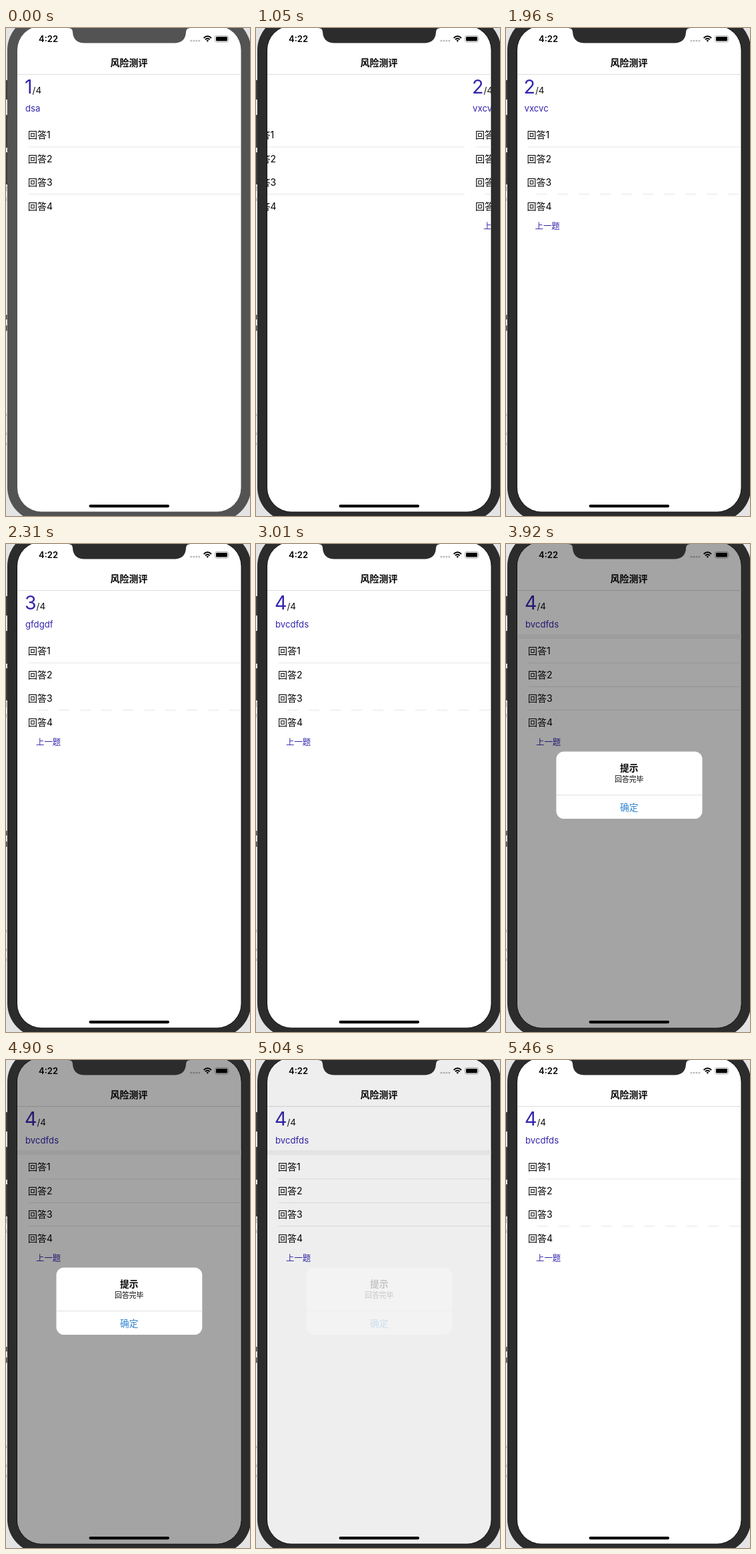
These frames come from a looping animation (366 px wide and 730 px high, 6.3 s). An HTML page:

```html
<!DOCTYPE html>
<html lang="zh">
<head>
<meta charset="utf-8">
<style>
html, body { margin: 0; width: 100%; height: 100%; overflow: hidden; background: #e4e4e4; }
svg { display: block; font-family: Inter, "Noto Sans CJK SC", "Noto Sans CJK", sans-serif; }
.ink { fill: #3426ae; }
.line { stroke: #e6e6e6; }
.mid { text-anchor: middle; }
</style>
</head>
<body>
<svg width="366" height="730" viewBox="0 0 366 730">
  <defs>
    <clipPath id="screen"><rect x="17" y="-3" width="335.5" height="726.5" rx="36"/></clipPath>
  </defs>
  <g fill="#3d3d3d">
    <path d="M0 78h3v29h-3zM0 130h3v49h-3zM0 186h3v48h-3z"/>
    <path d="M0 429h1.5v7H0zM0 445h1.5v8H0z"/>
    <path d="M0 237h1v7H0zM0 254h1v5H0zM0 577h1v4H0zM0 605h1v4H0zM0 620h1v4H0z" fill="#aaa"/>
  </g>
  <rect id="bezel" x="2" y="-18" width="365.5" height="756" rx="51"/>
  <rect id="rim" x="16.5" y="-3.5" width="336.5" height="727.5" rx="36.5" fill="none" stroke="#111"/>
  <g clip-path="url(#screen)">
    <rect width="366" height="730" fill="#fff"/>
    <g id="pages"></g>
    <path d="M17 69.5H353" stroke="#dcdcdc"/>
    <text class="mid" x="184.5" y="56.5" font-size="14" font-weight="600">风险测评</text>
    <text x="49" y="21" font-size="13" font-weight="600">4:22</text>
    <g fill="#bbb">
      <circle cx="277.8" cy="19.2" r="1.4"/><circle cx="281.8" cy="19.2" r="1.4"/>
      <circle cx="285.8" cy="19.2" r="1.4"/><circle cx="289.8" cy="19.2" r="1.4"/>
    </g>
    <g fill="none" stroke="#000" stroke-width="2">
      <path d="M296.6 14.9Q302.3 9.5 308 14.9M298.9 17.3Q302.3 14.2 305.7 17.3"/>
      <path d="M302.3 20.8l-1.9-2q1.9-1.6 3.8 0z" fill="#000" stroke="none"/>
    </g>
    <rect x="313.5" y="11.5" width="20" height="9.6" rx="2.6" fill="none" stroke="#aaa"/>
    <rect x="315" y="13" width="17" height="6.6" rx="1.4"/>
    <path d="M334.6 14.7q1.6 1.6 0 3.2z" fill="#aaa"/>
    <rect id="dim" width="366" height="730"/>
    <rect x="124.5" y="713" width="120.5" height="4.2" rx="2.1"/>
  </g>
  <path id="notch" d="M93 0Q100 0 100 6Q101 22.5 118 22.5H252Q269 22.5 270 6Q270 0 277 0z"/>
  <g id="alert">
    <rect id="card" x="75.5" y="310.5" width="218.8" height="100.5" rx="11.5" fill="#fff"/>
    <g id="message" class="mid">
      <path d="M75.5 375.5H294.3" stroke="#e0e0e0"/>
      <text x="184.7" y="340" font-size="13.7" font-weight="700">提示</text>
      <text x="184.7" y="356.3" font-size="10.8">回答完毕</text>
      <text x="184.7" y="398.5" font-size="13.7" fill="#2f86d0">确定</text>
    </g>
  </g>
</svg>
<script>
const LOOP = 6300, STEP = 70, PAGE_WIDTH = 335.5, DIM = 0.357;
const questions = ['dsa', 'vxcvc', 'gfdgdf', 'bvcdfds'];
const slides = [[970, 330], [1945, 320], [2700, 300]];
const $ = id => document.getElementById(id);
const set = (id, name, value) => $(id).setAttribute(name, value);

function pageMarkup(question, i) {
  const rows = [1, 2, 3, 4].map(n =>
    `<text x="33" y="${129.3 + 35.6 * n}" font-size="14">回答${n}</text>`).join('');
  const back = i ? '<text class="ink" x="45" y="301.3" font-size="12.4">上一题</text>' : '';
  const dash = i ? 'stroke-dasharray="16 16" stroke-dashoffset="-45"' : '';
  return `<g transform="translate(${i * PAGE_WIDTH})">
    <g class="shade">
      <rect x="17" y="135" width="335.5" height="7" fill="#f3f3f3"/>
      <path class="line" d="M34 213.5H352.5M34 248.5H352.5"/>
    </g>
    <path class="line" d="M34 177.9H352.5"/>
    <path class="line" d="M34 248.5H352.5" ${dash}/>
    <text class="ink" x="28" y="98" font-size="28.5">${i + 1}<tspan font-size="13.5" fill="#111">/4</tspan></text>
    <text class="ink" x="29" y="125" font-size="13.2">${question}</text>
    ${rows}${back}</g>`;
}
$('pages').innerHTML = questions.map(pageMarkup).join('');
const shades = document.querySelectorAll('.shade');

function ease(x) {
  x = Math.min(1, Math.max(0, x));
  return x < 0.5 ? 2 * x * x : 1 - 2 * (1 - x) ** 2;
}

// Critically damped spring from 0 to 1.
function spring(ms, speed) {
  const x = Math.max(0, ms) / 1000 * speed;
  return 1 - (1 + x) * Math.exp(-x);
}

function draw(t) {
  const page = slides.reduce((sum, [start, length]) => sum + ease((t - start) / length), 0);
  set('pages', 'transform', `translate(${-page * PAGE_WIDTH})`);

  const active = t >= 980;
  const frame = active ? '#2c2c2c' : '#535353';
  set('bezel', 'fill', frame);
  set('notch', 'fill', frame);
  set('rim', 'opacity', active ? 1 : 0);

  const shown = spring(t - 3640, 26);
  const visible = t >= 5180 ? 0 : shown * (1 - spring(t - 4906, 22.85));
  const scale = 1.2 - 0.2 * shown;
  set('dim', 'opacity', DIM * visible);
  set('card', 'opacity', Math.min(1, 1.45 * visible));
  set('message', 'opacity', visible);
  set('alert', 'transform', `translate(184.9 360.8) scale(${scale}) translate(-184.9 -360.8)`);
  shades.forEach(shade => shade.setAttribute('opacity', visible > 0 ? 1 : 0));
}

const origin = performance.now();
function tick() {
  const t = (performance.now() - origin) % LOOP;
  draw(Math.floor(t / STEP) * STEP);
  requestAnimationFrame(tick);
}
tick();
</script>
</body>
</html>
```
